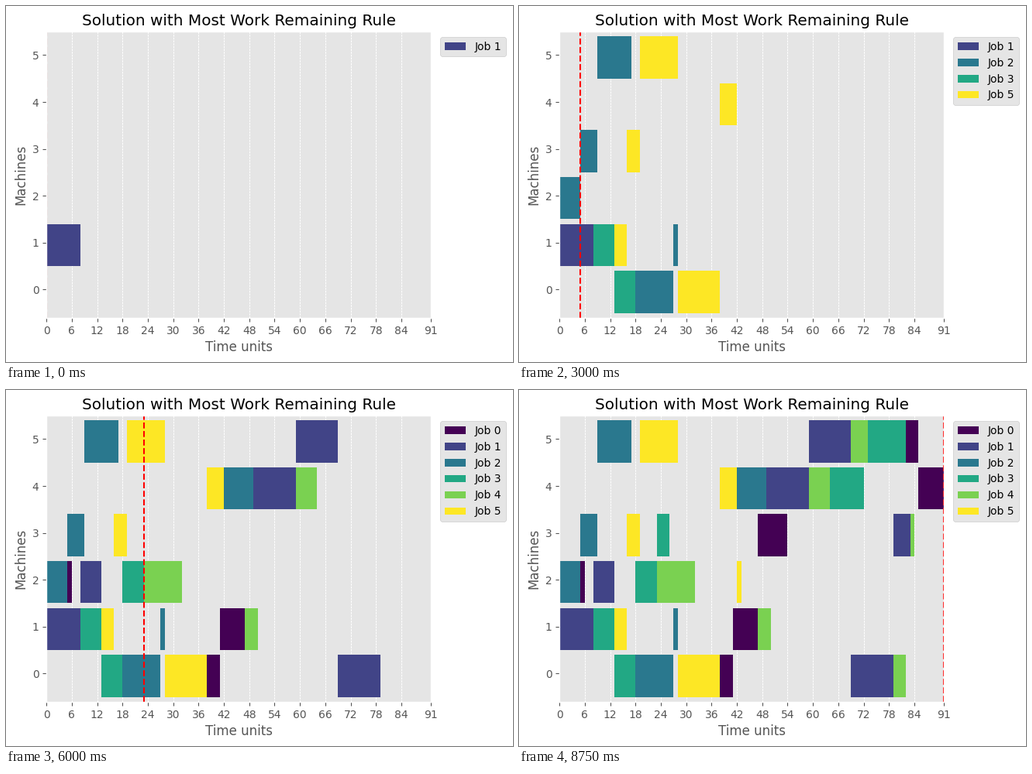
A matplotlib script that plays this animation: 654 by 460 pixels, repeating every 9 s.

```python
import matplotlib.pyplot as plt
from matplotlib.animation import FuncAnimation
from matplotlib.patches import Patch

W, H, DPI = 654, 460, 100
EPS = 1e-6  # keeps the pixel size from rounding down
LEFT, BOTTOM, AX_W, AX_H, PAD = 80, 52.8, 496, 369.6, 10

# Operation lengths, one row per job.
LENGTHS = [
    [1, 3, 6, 7, 3, 6],
    [8, 5, 10, 10, 10, 4],
    [5, 4, 8, 9, 1, 7],
    [5, 5, 5, 3, 8, 9],
    [9, 3, 5, 4, 3, 1],
    [3, 3, 9, 10, 4, 1],
]
N = len(LENGTHS)


def route(job):
    """Machines in visiting order: three patterns, mirrored on odd jobs."""
    a, b = (1, 2) if job % 2 else (2, 1)
    patterns = (
        [a, 0, b, 3, 3 + a, 3 + b],
        [a, b, 4, 5, 0, 3],
        [a, 3, 5, 0] + [b, 4][::a - b],
    )
    return patterns[job % 3]


JOBS = [list(zip(route(job), LENGTHS[job])) for job in range(N)]


def solve():
    """Dispatch by most work remaining; return the bars and the clock after each."""
    step, job_free, machine_free = [0] * N, [0] * N, [0] * N
    bars, clocks = [], []

    def ready():
        ops = []
        for job in range(N):
            if step[job] < len(JOBS[job]):
                machine, length = JOBS[job][step[job]]
                start = max(job_free[job], machine_free[machine])
                ops.append((job, machine, start, length))
        first_end = {}
        for _, m, s, d in ops:
            first_end[m] = min(s + d, first_end.get(m, s + d))
        return [op for op in ops if op[2] < first_end[op[1]]]

    def work_left(job, now):
        done = sum(d for j, _, s, d in bars if j == job and s + d <= now)
        return sum(LENGTHS[job]) - done

    ops = ready()
    while ops:
        now = min(op[2] for op in ops)
        job, machine, start, length = max(ops, key=lambda op: work_left(op[0], now))
        bars.append((job, machine, start, length))
        step[job] += 1
        job_free[job] = machine_free[machine] = start + length
        ops = ready()
        clocks.append(min((op[2] for op in ops), default=max(job_free)))
    return bars, clocks


bars, clocks = solve()
makespan = clocks[-1]

plt.style.use("ggplot")
plt.rcParams["font.family"] = "DejaVu Sans"
cmap = plt.get_cmap("viridis", N)

fig = plt.figure(figsize=(W / DPI + EPS, H / DPI + EPS), dpi=DPI)
ax = fig.add_axes([LEFT / W, BOTTOM / H, AX_W / W, AX_H / H])
ax.set_title("Solution with Most Work Remaining Rule")
ax.set_xlabel("Time units")
ax.set_ylabel("Machines")
ax.grid(True, axis="x", linestyle=(0, (2.64, 1.14)), linewidth=0.7)
ax.grid(False, axis="y")

blocks = [ax.broken_barh([(start, length)], (1 + 10 * machine, 9), facecolors=cmap(job))
          for job, machine, start, length in bars]
clock = ax.axvline(0, color="red", linestyle="--")
keys = [Patch(facecolor=cmap(job), label=f"Job {job}") for job in range(N)]

tick = makespan // 15
ax.set_xlim(0, makespan)
ax.set_xticks([*range(0, makespan - tick, tick), makespan])
ax.set_ylim(0, 1 + 10 * N)
ax.set_yticks([6 + 10 * m for m in range(N)], [str(m) for m in range(N)])


def draw(i):
    for n, block in enumerate(blocks):
        block.set_visible(n <= i)
    clock.set_xdata([clocks[i]] * 2)
    seen = sorted({bar[0] for bar in bars[:i + 1]})
    ax.legend(handles=[keys[job] for job in seen], loc="upper left",
              bbox_to_anchor=(1.01, 1), framealpha=1)


# Shift the axes so the labels sit PAD pixels from the left and bottom edges.
draw(0)
fig.draw_without_rendering()
tight = fig.get_tightbbox()
ax.set_position([(LEFT - tight.x0 * DPI + PAD) / W, (BOTTOM - tight.y0 * DPI + PAD) / H,
                 AX_W / W, AX_H / H])
ax.tick_params(axis="x", pad=3.6)

anim = FuncAnimation(fig, draw, frames=len(bars), interval=250, repeat=True,
                     cache_frame_data=False)
plt.show()
```
